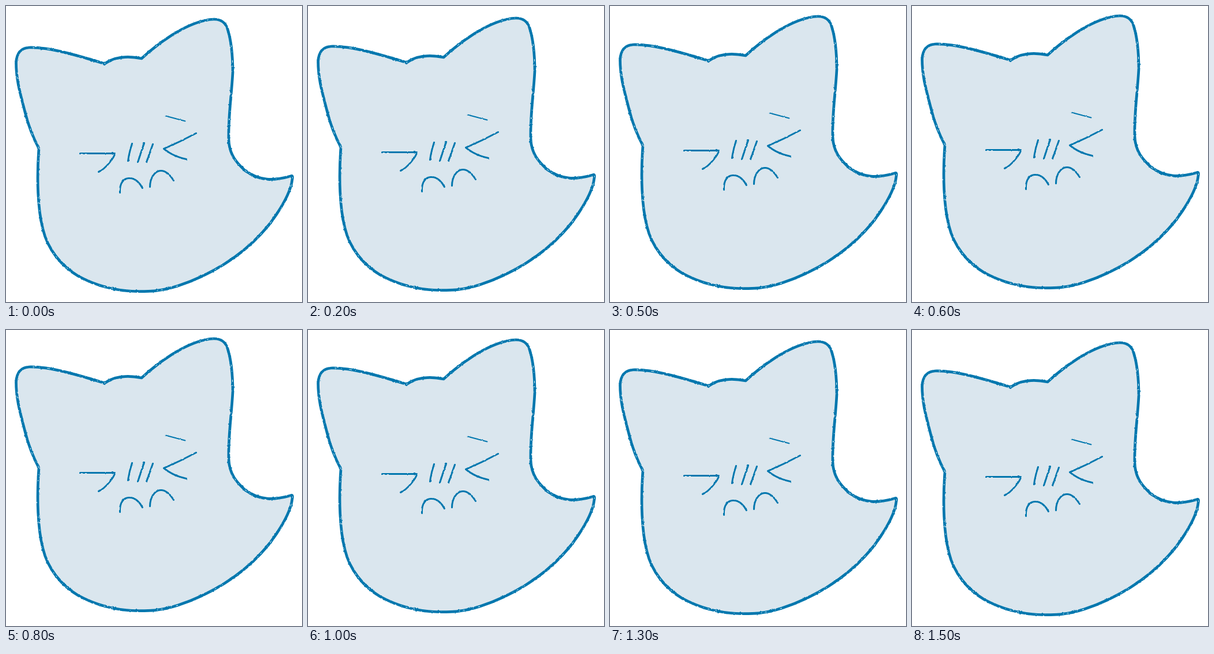
Write an HTML page that moves like this. It is 513x513 px and loops after 1600 ms.

```html
<!DOCTYPE html>
<html lang="en">
<head>
<meta charset="utf-8">
<title>Floating ghost cat</title>
<style>
  html, body { margin: 0; width: 100%; height: 100%; overflow: hidden; background: #fff; }
  svg { display: block; width: 100%; height: 100%; }
  .ink { fill: none; stroke: #0077ae; stroke-width: 3; stroke-linecap: round; stroke-linejoin: round; }
</style>
</head>
<body>
<svg viewBox="0 0 513 513">
  <defs>
    <filter id="crayon" filterUnits="userSpaceOnUse" x="0" y="0" width="513" height="513" color-interpolation-filters="sRGB">
      <feTurbulence type="fractalNoise" baseFrequency=".2" numOctaves="2" seed="4"/>
      <feDisplacementMap in="SourceGraphic" scale="2.4" xChannelSelector="R" yChannelSelector="G"/>
    </filter>
    <path id="body" d="M57 247C47 228 39 208 33.500 186C26 156 17.500 130 17.500 98C18.500 82 25 73 40 72
      C75 71 125 86 171 100C188 88 210 86 235 91C265 63 308 33 345 25C366 20 379 24 384 40
      C391 62 393 90 393 115C391 155 385 190 386 232C387 258 400 272 414 285
      C440 304 464 303 493 295C497 293 497 296 496 301C493 328 465 371 441 396
      C407 433 356 466 298 485C270 494 250 495 224 494.500C190 493.500 158 486 125 468
      C95 450 72 421 64 387C55 352 53 300 57 247Z"/>
  </defs>
  <g id="ghost">
    <use href="#body" fill="#dae6ee"/>
    <g class="ink" filter="url(#crayon)">
      <use href="#body" stroke-width="4.7"/>
      <use href="#body" stroke="#fff" stroke-width=".9" stroke-linecap="butt"
        stroke-dasharray="3 8 1 14 4 5 2 46 1 30 2 11 3 7 1 62"/>
      <g transform="translate(.5 .5)">
        <path stroke-width="2.2" d="M276 190L310 199"/>
        <path d="M329 220Q301 235 273 247C284 256 297 262 312 265"/>
        <path d="M128 255H188C188 261 172 282 160 287"/>
        <path d="M218 238Q213 253 211 268M239 237L228 270M254 239L243 270"/>
        <path d="M197 323C196 306 204 297 214 298C224 298 232 307 236 315"/>
        <path d="M249 313C249 298 257 285 268 285C277 285 285 294 290 302"/>
      </g>
    </g>
  </g>
</svg>
<script>
  const ghost = document.getElementById('ghost');
  const STEP = 100, STEPS = 16;

  // Rise one pixel per step for half the loop, then sink back.
  function draw() {
    const step = Math.floor(performance.now() / STEP) % STEPS;
    const lift = Math.min(step, STEPS - step);
    ghost.setAttribute('transform', `translate(0 ${-lift})`);
    requestAnimationFrame(draw);
  }
  draw();
</script>
</body>
</html>
```
